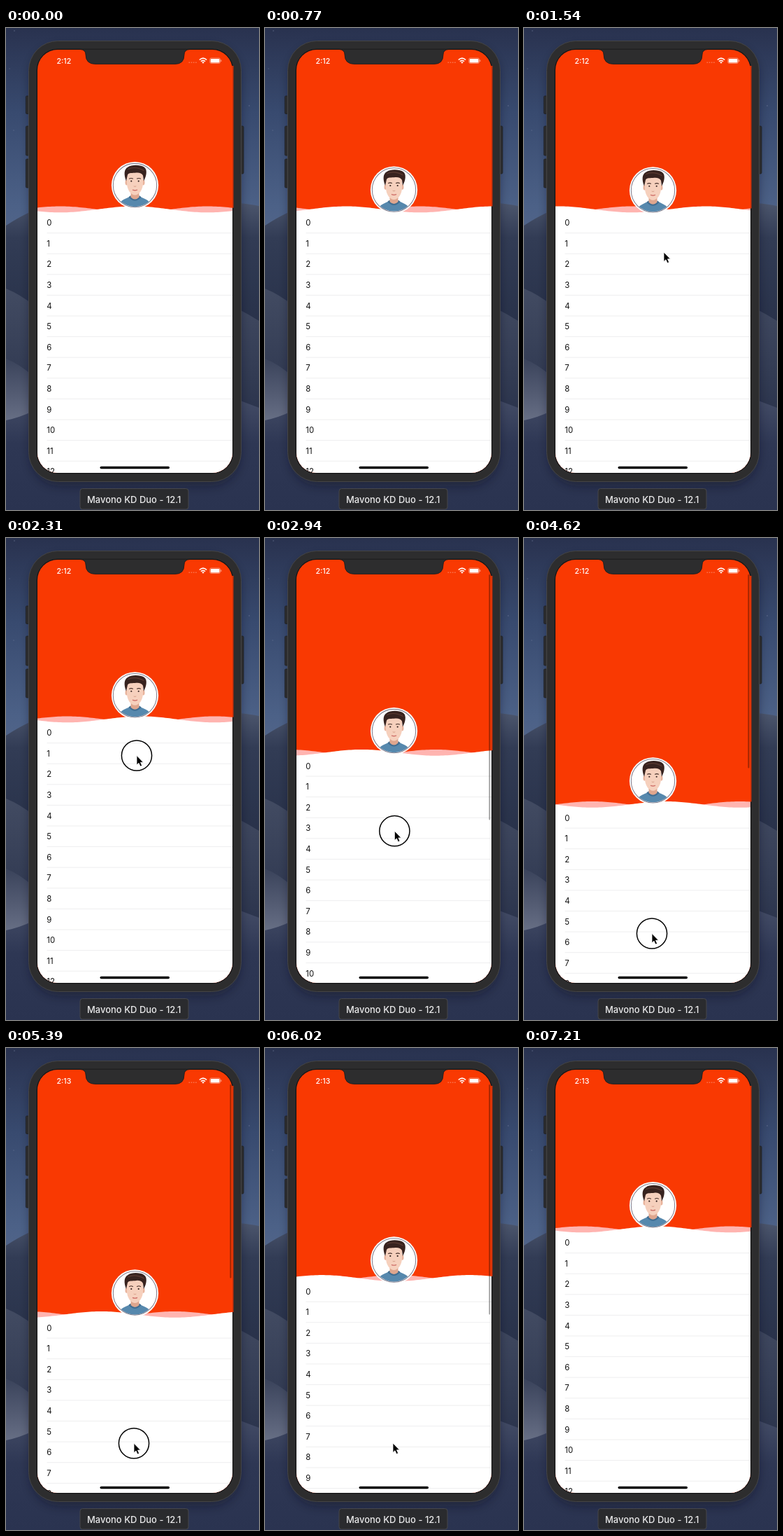
Recreate the animation shown at these times as an HTML page. Size 362 px wide and 688 px high, loop 7.28 s.

```html
<!DOCTYPE html>
<html lang="en">
<head>
<meta charset="utf-8">
<title>Wave header</title>
<style>
html, body { margin: 0; width: 100%; height: 100%; overflow: hidden; background: #2b3350; }
svg { display: block; width: 100vw; height: 100vh; }
text { font-family: Inter, Roboto, sans-serif; }
.row text { font-size: 11.4px; fill: #111; }
.row path { stroke: #ececee; stroke-width: .9; }
.clock { font-size: 10.6px; font-weight: 500; fill: #fff; }
.caption { font-size: 13px; font-weight: 500; fill: #e9e9ea; text-anchor: middle; }
</style>
</head>
<body>
<svg viewBox="0 0 362 688">
  <defs>
    <linearGradient id="sky" x2="0" y2="1">
      <stop offset="0" stop-color="#29324f"/>
      <stop offset=".4" stop-color="#384a6f"/>
      <stop offset=".85" stop-color="#4c6187"/>
      <stop offset="1" stop-color="#526589"/>
    </linearGradient>
    <linearGradient id="far" x2="0" y2="1">
      <stop offset="0" stop-color="#4c566d"/>
      <stop offset=".2" stop-color="#323c55"/>
      <stop offset="1" stop-color="#222b43"/>
    </linearGradient>
    <linearGradient id="mid" x2="0" y2="1">
      <stop offset="0" stop-color="#424b62"/>
      <stop offset="1" stop-color="#252e47"/>
    </linearGradient>
    <linearGradient id="lit" x2="0" y2="1">
      <stop offset="0" stop-color="#3a435b"/>
      <stop offset="1" stop-color="#6b7389"/>
    </linearGradient>
    <linearGradient id="floor" x2="0" y2="1">
      <stop offset="0" stop-color="#434c66"/>
      <stop offset=".4" stop-color="#2e3754"/>
      <stop offset="1" stop-color="#2a3350"/>
    </linearGradient>
    <clipPath id="screen"><rect x="45" y="31" width="279" height="604" rx="29"/></clipPath>
    <clipPath id="disc"><circle r="30.6"/></clipPath>
    <filter id="soft" x="-20%" y="-20%" width="140%" height="140%"><feGaussianBlur stdDeviation="7"/></filter>
  </defs>

  <!-- Wallpaper -->
  <rect width="362" height="300" fill="url(#sky)"/>
  <path d="M0 282Q18 270 40 260L320 249Q342 250 362 254V500H0Z" fill="url(#far)"/>
  <path d="M0 372Q20 380 40 396L330 400Q346 408 362 418V600H0Z" fill="url(#mid)"/>
  <path d="M0 472Q20 480 40 498V570H0Z" fill="url(#lit)"/>
  <path d="M0 560Q20 556 40 546L330 530Q346 536 362 542V688H0Z" fill="url(#floor)"/>
  <g fill="#8f9ab8" opacity=".6">
    <circle cx="12" cy="4" r=".7"/><circle cx="5" cy="58" r=".6"/><circle cx="348" cy="111" r=".7"/><circle cx="11" cy="146" r=".6"/>
  </g>

  <!-- Phone body -->
  <rect x="34" y="26" width="302" height="628" rx="44" fill="#0a0f1d" opacity=".4" filter="url(#soft)"/>
  <g fill="#2c2c2e" stroke="#202124" stroke-width=".8">
    <rect x="28.4" y="97" width="6" height="25.5" rx="1.5"/>
    <rect x="28.4" y="140" width="6" height="42" rx="1.5"/>
    <rect x="28.4" y="187" width="6" height="41" rx="1.5"/>
    <rect x="334" y="140" width="6" height="68" rx="1.5"/>
  </g>
  <rect x="32.5" y="18.5" width="304" height="629" rx="42" fill="#2d2d2e" stroke="#454546"/>

  <!-- Screen -->
  <rect x="44.4" y="30.4" width="280.2" height="605.2" rx="29.6" fill="none" stroke="#141415" stroke-width="1.2"/>
  <rect id="edge" x="322" y="54" width="3.6" fill="#c9310c"/>
  <g clip-path="url(#screen)">
    <rect x="45" y="31" width="279" height="604" fill="#f93902"/>
    <g id="sheet">
      <path id="back" fill="#ffb4b0"/>
      <path id="front" fill="#fff"/>
      <g id="rows"></g>
      <g id="avatar">
        <circle r="33.6" fill="#fff"/>
        <circle r="31.2" fill="#fff" stroke="#85808f" stroke-width="1.1"/>
        <g clip-path="url(#disc)">
          <path d="M-25 32C-23 22-15 20-7 16H7C15 20 23 22 25 32Z" fill="#5688ad"/>
          <path d="M-9 17Q0 27 9 17L7 15H-7Z" fill="#3f6d92"/>
          <path d="M-6 6V17Q0 23 6 17V6Z" fill="#dfa68e"/>
          <ellipse cx="-12" cy="-4" rx="2" ry="3.8" fill="#e9b49d"/>
          <ellipse cx="12" cy="-4" rx="2" ry="3.8" fill="#e9b49d"/>
          <path d="M-11.5-17Q0-23 11.5-17V-3C11.5 6 6 14 0 14S-11.5 6-11.5-3Z" fill="#f6d0bd"/>
          <path d="M-12.5-6C-16-15-16-23-10-26C-5-30 8-29.500 13-26C18-23 17-14 12.500-6L11.500-14C10-17 6-18.500 2-18C-4-17.500-9-18-10.500-15Z" fill="#38231f"/>
          <path d="M-10-23Q0-28 13-21" fill="none" stroke="#5b3a31" stroke-width="1.2"/>
          <g fill="none" stroke="#4a332c" stroke-linecap="round">
            <path d="M-8-9.500Q-5.500-10.700-3-9.500M3-9.500Q5.500-10.700 8-9.500" stroke-width="1.1"/>
            <path d="M-1.400 1.400Q0 2.200 1.400 1.400" stroke="#d39a84"/>
            <path d="M-3 6.600Q0 7.800 3 6.600" stroke="#cf6f68" stroke-width="1.4"/>
          </g>
          <circle cx="-5.200" cy="-6" r="1.100" fill="#33221f"/>
          <circle cx="5.200" cy="-6" r="1.100" fill="#33221f"/>
        </g>
      </g>
    </g>
    <rect id="bar" x="320.4" y="52" width="2" rx="1" fill="#000" fill-opacity=".36"/>
    <rect x="134.5" y="625.8" width="99.5" height="3.4" rx="1.7" fill="#000"/>
  </g>

  <!-- Notch and status bar -->
  <path d="M106 30.5Q114 31 114 38Q114 51.5 128 51.5H242Q255 51.5 255 38Q255 31 263 30.5Z" fill="#2d2d2e"/>
  <path d="M106 30.5Q114 31 114 38Q114 51.5 128 51.5H242Q255 51.5 255 38Q255 31 263 30.5" fill="none" stroke="#1b1a1a" stroke-width=".8"/>
  <text id="clock" class="clock" x="72.5" y="50.6">2:12</text>
  <path d="M261.5 49.2H273" stroke="#fff" stroke-opacity=".3" stroke-width="1.6" stroke-dasharray="1.6 1.6"/>
  <g fill="none" stroke="#fff" stroke-width="1.6">
    <path d="M276.8 45.5Q282 40.6 287.2 45.5M278.9 47.7Q282 44.9 285.1 47.7"/>
  </g>
  <path d="M280.2 48.9Q282 47.5 283.8 48.9L282 50.8Z" fill="#fff"/>
  <rect x="291.7" y="42.9" width="14.8" height="7.6" rx="2" fill="none" stroke="#fff" stroke-opacity=".5" stroke-width=".8"/>
  <rect x="292.7" y="43.9" width="12.8" height="5.6" rx="1.2" fill="#fff"/>
  <path d="M307.8 45.4V48" stroke="#fff" stroke-opacity=".6"/>

  <!-- Device caption -->
  <rect x="106" y="657.5" width="155" height="29.5" rx="3.5" fill="#2a2b2e" stroke="#46474b"/>
  <text class="caption" x="183.2" y="677.6">Mavono KD Duo - 12.1</text>

  <!-- Pointer -->
  <g id="pointer">
    <circle id="ring" r="21.6" fill="none" stroke="#000" stroke-width="1.5"/>
    <path d="M0 0V13.4L3 10.7L5.1 15.5L7.6 14.4L5.5 9.8H9.5Z" fill="#000" stroke="#fff" stroke-width=".8"/>
  </g>
</svg>
<script>
const LOOP = 7280, TICK = 70, PITCH = 29.6;
const LEFT = 45, RIGHT = 324, MID = 184.5;
const WAVE_K = 2 * Math.PI / 211, WAVE_Y = 258.9, WAVE_H = 4.4;
const RELEASE = 5880;
const $ = id => document.getElementById(id);
const set = (id, attrs) => {
  for (const name in attrs) $(id).setAttribute(name, attrs[name]);
};

// Rows of [time, value, ...], eased between neighbours
function track(t, keys) {
  if (t <= keys[0][0]) return keys[0].slice(1);
  for (let i = 1; i < keys.length; i++) {
    const a = keys[i - 1], b = keys[i];
    if (t > b[0]) continue;
    const p = (t - a[0]) / (b[0] - a[0]);
    const e = p * p * (3 - 2 * p);
    return a.slice(1).map((v, j) => v + (b[j + 1] - v) * e);
  }
  return keys[keys.length - 1].slice(1);
}

const POINTER = [
  [1120, 372, 356], [1400, 215, 340], [1540, 200, 320], [2240, 187, 310.5], [2310, 187, 310.5],
  [3640, 183.5, 544.3], [4620, 183, 564.5], [6230, 183, 564], [6580, 372, 556]
];
const PULL = [[2310, 0], [3640, 103], [4620, 121.5]];

function pullAt(t) {
  const [pull] = track(t, PULL);
  if (t < RELEASE) return pull;
  const s = (t - RELEASE) * 0.0104;
  return pull * (1 + s) * Math.exp(-s);
}

// Three wavelengths pass to the left in one loop
function swell(x, t) {
  return WAVE_H * Math.cos(WAVE_K * (x - 183) + 6 * Math.PI * t / LOOP);
}

function wavePath(t, sign) {
  let d = `M${LEFT} 700`;
  for (let x = LEFT; x <= RIGHT; x += 3) d += `L${x} ${(WAVE_Y - sign * swell(x, t)).toFixed(2)}`;
  return d + `V700Z`;
}

function draw(t) {
  const pull = pullAt(t);
  const [px, py] = track(t, POINTER);
  const touching = t >= 2240 && t < RELEASE;
  set('back', { d: wavePath(t, -1) });
  set('front', { d: wavePath(t, 1) });
  set('sheet', { transform: `translate(0 ${pull.toFixed(2)})` });
  set('avatar', { transform: `translate(${MID} ${(229 - swell(MID, t)).toFixed(2)})` });
  set('edge', { height: WAVE_Y - 54 + pull - Math.abs(swell(RIGHT, t)) });
  set('bar', { height: 398 - pull, opacity: Math.min(1, pull / 15) });
  set('pointer', {
    transform: `translate(${px} ${py})`,
    visibility: t >= 1120 && t < 6580 ? 'visible' : 'hidden'
  });
  set('ring', { opacity: touching ? 1 : 0 });
  $('clock').textContent = t < 5320 ? '2:12' : '2:13';
}

$('rows').innerHTML = Array.from({ length: 13 }, (_, i) => {
  const y = 278 + i * PITCH;
  return `<g class="row"><text x="58.3" y="${y + 4.1}">${i}</text><path d="M58.5 ${y + 14.6}H324"/></g>`;
}).join('');

const start = performance.now();
function frame() {
  const t = (performance.now() - start) % LOOP;
  draw(Math.floor(t / TICK) * TICK);
  requestAnimationFrame(frame);
}
frame();
</script>
</body>
</html>
```
